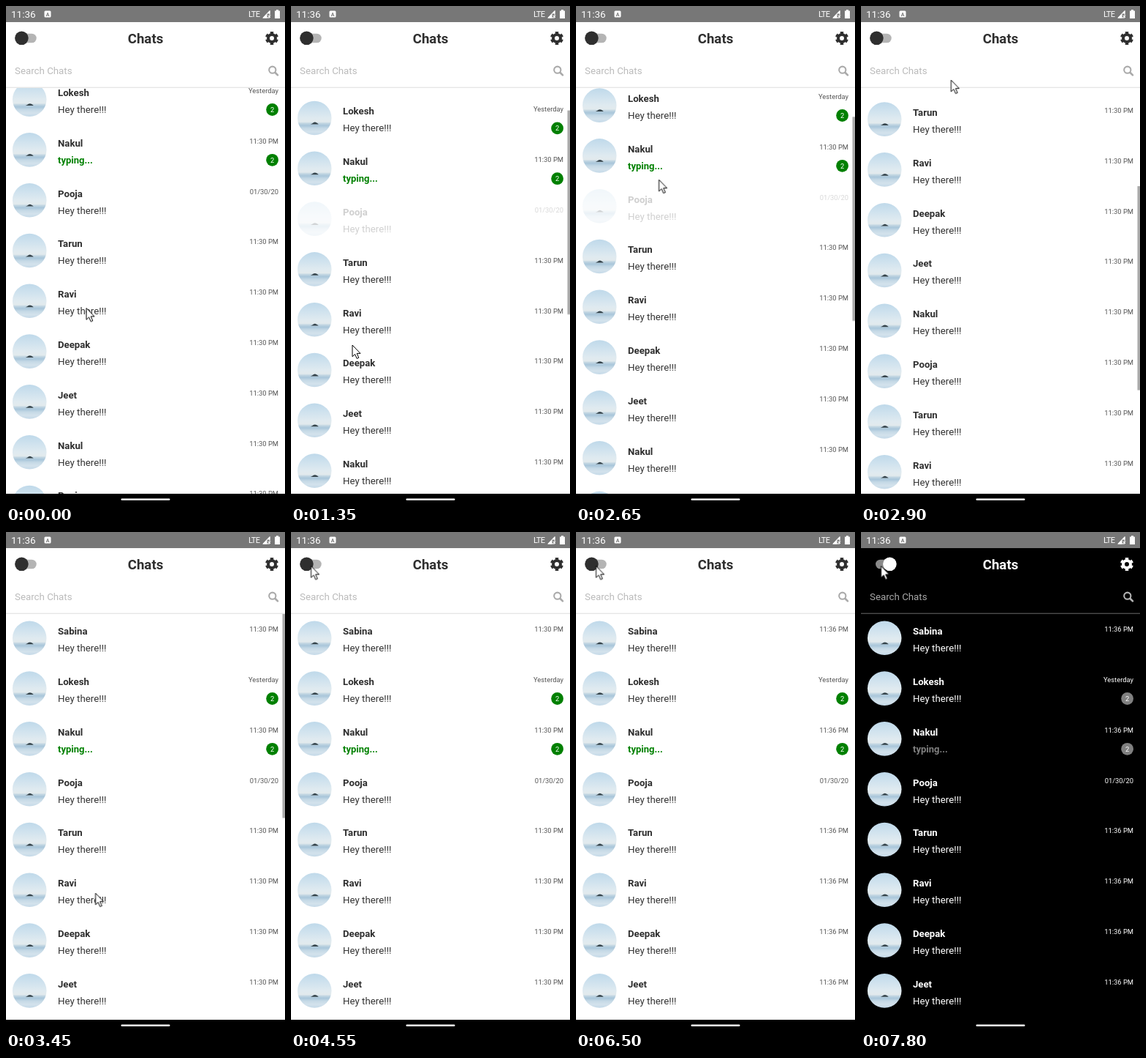
An HTML page that plays this animation: 382x680 px, repeating every 8 s.

```html
<!DOCTYPE html>
<html lang="en">
<head>
<meta charset="utf-8">
<title>Chats</title>
<style>
@property --scroll { syntax: '<length>'; inherits: true; initial-value: 0px; }

html, body { margin: 0; width: 100%; height: 100%; overflow: hidden; }
svg { display: block; }
#app {
  --bg: #fff; --ink: #2f2f2f; --text: #333; --dim: #555; --accent: #008000;
  --hint: #bbb; --icon: #aaa; --line: #ddd; --track: #b4b4b4;
  font-family: Roboto, Arial, sans-serif;
  animation: scroll 8s linear infinite, theme 8s step-end infinite;
}
.bg { fill: var(--bg); }
.ink { fill: var(--ink); }
.title { font-size: 18.7px; font-weight: 700; text-anchor: middle; }
.hint { font-size: 13.3px; fill: var(--hint); }
.name { font-size: 13.2px; font-weight: 700; }
.msg { font-size: 13.3px; fill: var(--text); }
.typing { font-size: 13px; font-weight: 700; fill: var(--accent); }
.time { font-size: 9.4px; fill: var(--dim); text-anchor: end; }
.badge { fill: var(--accent); }
.count { font-size: 9.4px; fill: #fff; text-anchor: middle; }
.before { animation: before 8s step-end infinite; }
.after { animation: after 8s step-end infinite; }

#list { transform: translateY(calc(-1 * var(--scroll))); }
#bar { transform: translateY(calc(.505 * var(--scroll))); animation: bar 8s linear infinite; }
.press { animation: press 8s linear infinite; }
#thumb { animation: thumb 8s ease-in-out infinite; }
#cursor { animation: cursor 8s linear infinite; }

@keyframes scroll {
  0%, 15.625% { --scroll: 86px; }
  16.25% { --scroll: 82px; }
  16.875% { --scroll: 61px; }
  18.75%, 31.6% { --scroll: 0px; }
  32.5% { --scroll: 36px; }
  33.125% { --scroll: 77px; }
  35% { --scroll: 225px; }
  36.875%, 38.5% { --scroll: 285px; }
  39.4% { --scroll: 225px; }
  41.25% { --scroll: 40px; }
  42.5%, 100% { --scroll: 0px; }
}
@keyframes theme {
  60.625%, 92.5%, 100% {
    --bg: #000; --ink: #fff; --text: #fff; --dim: #fff; --accent: #808080;
    --hint: #a8a8a8; --icon: #b4b4b4; --line: #6a6a6a; --track: #8a8a8a;
  }
  78.75% {
    --bg: #fff; --ink: #2f2f2f; --text: #333; --dim: #555; --accent: #008000;
    --hint: #bbb; --icon: #aaa; --line: #ddd; --track: #b4b4b4;
  }
}
@keyframes before { 0% { opacity: 1; } 60.625%, 100% { opacity: 0; } }
@keyframes after { 0% { opacity: 0; } 60.625%, 100% { opacity: 1; } }
@keyframes bar {
  0%, 15.62% { opacity: 0; }
  15.63%, 23.75% { opacity: 1; }
  27%, 31.59% { opacity: 0; }
  31.6%, 49.5% { opacity: 1; }
  53%, 100% { opacity: 0; }
}
@keyframes press {
  0%, 15.4% { opacity: 1; }
  16.6%, 17% { opacity: .23; }
  20%, 31% { opacity: 1; }
  32.4%, 33.4% { opacity: .23; }
  36.5%, 100% { opacity: 1; }
}
@keyframes thumb {
  0%, 59.4% { transform: translateX(0); }
  62%, 77.5% { transform: translateX(18px); }
  80%, 90.6% { transform: translateX(0); }
  93.5%, 100% { transform: translateX(18px); }
}
@keyframes cursor {
  0%, 6.875% { transform: translate(110px, 412.5px); }
  9.06% { transform: translate(138px, 330px); }
  11.25%, 15.625% { transform: translate(125px, 242px); }
  16.25% { transform: translate(105px, 335px); }
  16.875% { transform: translate(84px, 462px); }
  18.125% { transform: translate(80px, 560px); }
  21.25% { transform: translate(90px, 595px); }
  26.25% { transform: translate(105px, 480px); }
  30.625% { transform: translate(118px, 350px); }
  31.9% { transform: translate(116px, 322px); }
  33.125% { transform: translate(113.5px, 238px); }
  35% { transform: translate(120px, 120px); }
  36.875% { transform: translate(125px, 92px); }
  38.75% { transform: translate(122px, 160px); }
  41.25% { transform: translate(120px, 380px); }
  43.125% { transform: translate(122.5px, 493px); }
  45.6% { transform: translate(124px, 520px); }
  48.1% { transform: translate(115px, 470px); }
  52.5% { transform: translate(55px, 120px); }
  54.4% { transform: translate(25px, 8px); }
  55.6% { transform: translate(25px, 30px); }
  56.875%, 100% { transform: translate(27.5px, 46.5px); }
}
</style>
</head>
<body>
<svg id="app" width="382" height="680" viewBox="0 0 382 680">
  <defs>
    <linearGradient id="sky" x2="0" y2="1">
      <stop offset="0" stop-color="#bfd9ea"/>
      <stop offset=".25" stop-color="#cfe2ee"/>
      <stop offset=".5" stop-color="#dfeaf0"/>
      <stop offset=".61" stop-color="#e2eaed"/>
      <stop offset=".66" stop-color="#bfd4e1"/>
      <stop offset=".72" stop-color="#a9c6da"/>
      <stop offset=".8" stop-color="#c5d9e6"/>
      <stop offset=".9" stop-color="#d3e2ec"/>
      <stop offset="1" stop-color="#c4d9e8"/>
    </linearGradient>
    <clipPath id="view"><rect y="112" width="382" height="554"/></clipPath>
    <g id="avatar">
      <circle r="23.3" fill="url(#sky)"/>
      <path d="M-5.5 8.4Q-3 7.4-1.5 6.2Q.5 5 2.5 6.2Q4.5 7 5.5 8.4Z" fill="#35434a"/>
    </g>
  </defs>

  <rect class="bg" width="382" height="680"/>
  <g clip-path="url(#view)">
    <g id="list"></g>
    <rect id="bar" x="378.5" y="112" width="3.5" height="278.5" fill="#aaa"/>
  </g>

  <!-- header -->
  <rect y="110.7" width="382" height="1" style="fill:var(--line)"/>
  <rect x="20" y="37.7" width="21.7" height="12.6" rx="6.3" style="fill:var(--track)"/>
  <circle id="thumb" class="ink" cx="21.4" cy="43.8" r="9.3"/>
  <text class="title ink" x="191" y="50.8">Chats</text>
  <g transform="translate(364 44) rotate(90)" fill="none" style="stroke:var(--ink)">
    <circle r="5" stroke-width="4"/>
    <circle r="7.3" stroke-width="3.4" pathLength="12" stroke-dasharray="1.1 .9" stroke-dashoffset=".55"/>
  </g>
  <text class="hint" x="12" y="93">Search Chats</text>
  <g fill="none" stroke-linecap="round" style="stroke:var(--icon)">
    <circle cx="364.8" cy="87.2" r="4.6" stroke-width="2.1"/>
    <path d="M368.6 91L372 94.4" stroke-width="2.6"/>
  </g>

  <!-- system bars -->
  <rect width="382" height="22" fill="#777"/>
  <g fill="#fff">
    <text x="7" y="16.3" font-size="13.5">11:36</text>
    <rect x="52.5" y="6.5" width="9" height="9" rx="1.5"/>
    <text x="57" y="13.6" font-size="7" font-weight="700" text-anchor="middle" fill="#777">A</text>
    <text x="332" y="15.3" font-size="11" letter-spacing="-.6">LTE</text>
    <path d="M351 16.5L361.5 6V10.5H357.5V16.5Z"/>
    <path d="M352 16H361V6.6Z" fill="none" stroke="#fff"/>
    <path d="M358.5 12.5l3.5 3.5m0-3.5l-3.5 3.5" stroke="#fff"/>
    <path d="M368 6.5h2v-1.5h3v1.5h2v10.5h-7Z"/>
  </g>
  <rect y="666" width="382" height="14"/>
  <rect x="157.5" y="672.5" width="67" height="2.6" rx="1.3" fill="#fff"/>

  <path id="cursor" d="M0 0V15.8L3.6 12.4L6.2 18.4L8.8 17.3L6.2 11.4H11Z" fill="#fff" stroke="#000" stroke-width="1"/>
</svg>
<script>
const names = ['Sabina', 'Lokesh', 'Nakul', 'Pooja', 'Tarun', 'Ravi', 'Deepak', 'Jeet'];
const rowHeight = 68.8, rowCount = 16;

const stamp = (text, cls = '') => `<text class="time ${cls}" x="373" y="136.2">${text}</text>`;

function timeOf(i) {
  if (i === 1) return stamp('Yesterday');
  if (i === 3) return stamp('01/30/20');
  return stamp('11:30 PM', 'before') + stamp('11:36 PM', 'after');
}

function row(i) {
  // the first two contacts appear only once
  const name = names[i < 8 ? i : 2 + (i - 2) % 6];
  const typing = i === 2;
  const badge = i === 1 || typing
    ? '<circle class="badge" cx="364.6" cy="158.7" r="8.4"/>' +
      '<text class="count" x="364.6" y="162">2</text>'
    : '';
  return `<g transform="translate(0 ${i * rowHeight})"><g class="${i === 3 ? 'press' : ''}">
    <use href="#avatar" x="32.2" y="144.8"/>
    <text class="name ink" x="71" y="140.2">${name}</text>
    <text class="${typing ? 'typing' : 'msg'}" x="71" y="163.2">${typing ? 'typing...' : 'Hey there!!!'}</text>
    ${timeOf(i)}${badge}</g></g>`;
}

document.getElementById('list').innerHTML =
  Array.from({ length: rowCount }, (_, i) => row(i)).join('');
</script>
</body>
</html>
```
